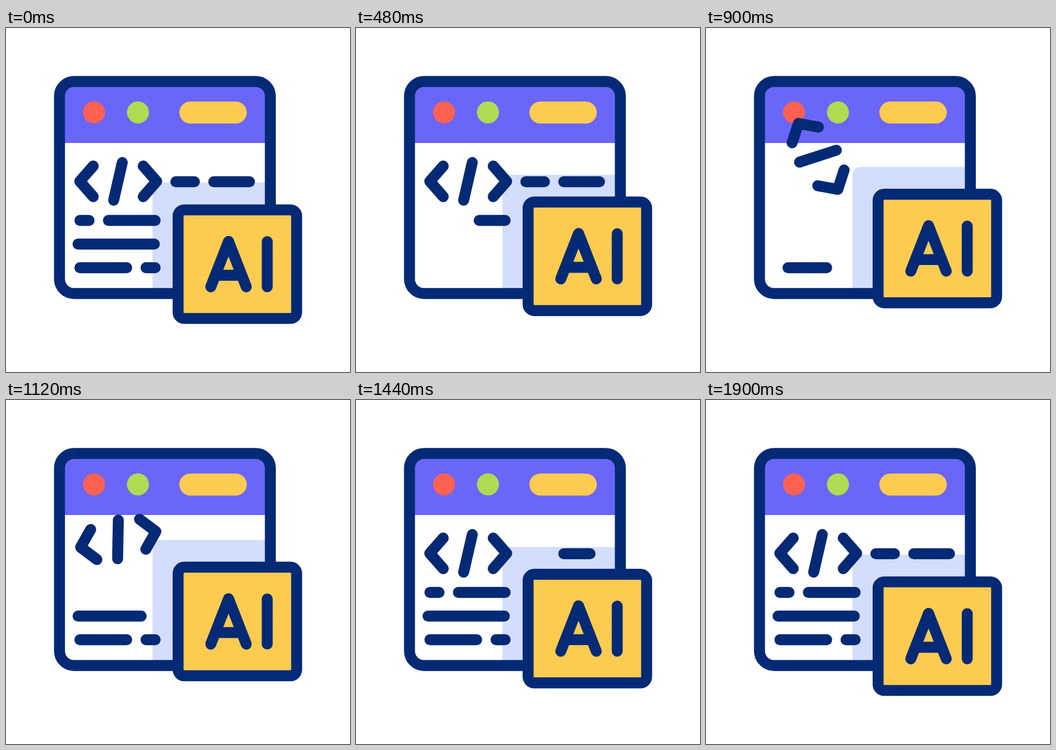
Write an HTML page that moves like this. It is 640 px wide and 640 px high and loops after 1.96 s.

```html
<!DOCTYPE html>
<html lang="en">
<head>
<meta charset="utf-8">
<title>AI code window</title>
<style>
  html, body { margin: 0; width: 100%; height: 100%; overflow: hidden; background: #fff; }
  svg { display: block; width: 100%; height: 100%; }
  .ink { fill: none; stroke: #042a75; stroke-width: 20.4; stroke-linecap: round; stroke-linejoin: round; }
</style>
</head>
<body>
<svg viewBox="0 0 640 640">
  <clipPath id="inside"><rect x="99.5" y="99.5" width="392.5" height="394.5" rx="27"/></clipPath>
  <g clip-path="url(#inside)">
    <path fill="#6a66fa" d="M99 99h394v115H99z"/>
    <rect id="shade" x="272.5" width="240" height="300" rx="15" fill="#d3ddfe"/>
  </g>
  <circle cx="163.8" cy="157" r="20.5" fill="#ff6152"/>
  <circle cx="245.5" cy="157" r="20.5" fill="#b1da53"/>
  <rect x="322.5" y="136.7" width="125.5" height="41" rx="20.5" fill="#fdcb50"/>
  <rect class="ink" x="99.5" y="99.5" width="392.3" height="394.5" rx="27"/>
  <g id="lines" class="ink"></g>
  <path id="code" class="ink" d="M-46-28.5L-71 0L-46 28.5M8-35L-8 35M47-28.5L72 0L47 28.5"/>
  <g id="chip" class="ink">
    <rect x="320.2" y="338.4" width="220.5" height="202" rx="11.5" fill="#fdcb50"/>
    <path d="M381 481.5L414 397L447 481.5M391 460H437M486 397.5V481.5"/>
  </g>
</svg>
<script>
const LOOP = 1960;
const $ = id => document.getElementById(id);
const ramp = (t, from, to) => Math.min(1, Math.max(0, (t - from) / (to - from)));
const ease = x => x * x * (3 - 2 * x);
const hump = (t, start, top, hold, end) =>
  ease(ramp(t, start, top)) - ease(ramp(t, hold, end));

// y, left, right, in the order in which they vanish and return
const lines = [
  [446, 137.5, 224.5], [446, 260.5, 277.5], [402, 134, 276], [358, 137.5, 154.5],
  [358, 190.5, 277.5], [286, 386.5, 453], [286, 316, 350.5]
].map(([y, left, right]) => {
  const el = document.createElementNS("http://www.w3.org/2000/svg", "path");
  $("lines").append(el);
  return { el, y, left, right };
});

function drawLine({ el, y, left, right }, i, t) {
  const gone = ramp(t, 145 + i * 75.6, 145 + (i + 1) * 75.6);
  const back = ramp(t, 810 + i * 110, 810 + (i + 1) * 110);
  const shown = 1 - gone + back;
  const len = (right - left) * shown;
  const fromRight = gone < 1 || i === 0;
  const x = fromRight ? right - len : left;
  el.setAttribute("d", shown > 0 ? `M${x} ${y}h${len}` : "");
}

function draw(t) {
  const lift = 29.3 * hump(t, 20, 940, 980, 1880);
  $("chip").setAttribute("transform", `translate(0 ${-lift})`);
  $("shade").setAttribute("y", 287.6 - lift);

  const jump = 50 * hump(t, 630, 950, 950, 1300);
  const turn = 360 * ramp(t, 856, 1130);
  $("code").setAttribute("transform", `translate(208.3 ${285.3 - jump}) rotate(${turn})`);

  lines.forEach((line, i) => drawLine(line, i, t));
}

const start = performance.now();
function tick() {
  draw((performance.now() - start) % LOOP);
  requestAnimationFrame(tick);
}
tick();
</script>
</body>
</html>
```
